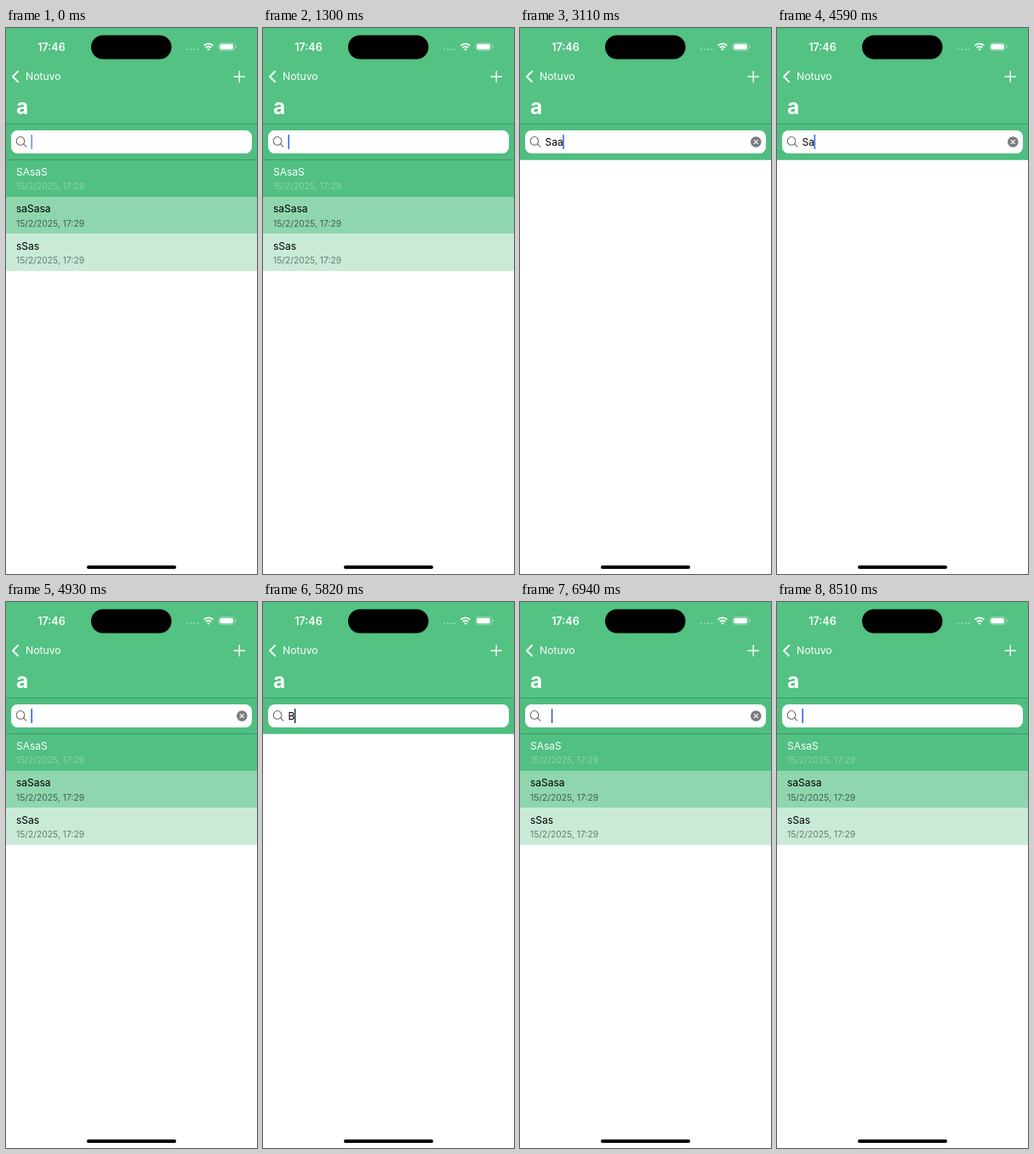
These frames come from a looping animation (295x640 px, 8.63 s). An HTML page:

```html
<!DOCTYPE html>
<html lang="en">
<head>
<meta charset="utf-8">
<title>List search</title>
<style>
  html, body { margin: 0; width: 100%; height: 100%; overflow: hidden; background: #fff; }
  svg { display: block; width: 295px; height: 640px; font: 12px Inter, "Noto Sans", sans-serif; }
  .date { font-size: 10.3px; }
  .line { fill: none; stroke-linecap: round; stroke-linejoin: round; }
</style>
</head>
<body>
<svg viewBox="0 0 295 640">
  <rect width="295" height="154.5" fill="#53c283"/>
  <rect y="113" width="295" height="41.5" fill="#4fbe80"/>
  <rect y="112" width="295" height="1" fill="#40986a"/>

  <!-- Status bar -->
  <text x="37.3" y="26.6" fill="#fff" font-size="12.5" font-weight="600">17:46</text>
  <rect x="100" y="8.5" width="94.5" height="28" rx="14"/>
  <path class="line" d="M213 25h13" stroke="#fff" stroke-opacity=".4" stroke-width="2.2" stroke-dasharray="0 4.2"/>
  <g class="line" stroke="#fff" stroke-width="1.9" style="stroke-linecap:butt">
    <path d="M232.6 20.6a7.6 7.6 0 0 1 10.8 0"/>
    <path d="M234.8 23.1a4.5 4.5 0 0 1 6.4 0"/>
  </g>
  <path d="M236.2 24.9a2.6 2.6 0 0 1 3.6 0L238 26.8z" fill="#fff"/>
  <rect x="250" y="17.5" width="19" height="9" rx="3" fill="none" stroke="#fff" stroke-opacity=".4" stroke-width=".8"/>
  <rect x="251.3" y="18.7" width="15.7" height="6.6" rx="2" fill="#fff"/>
  <path d="M270.2 20.5v3" stroke="#fff" stroke-opacity=".5"/>

  <!-- Navigation bar -->
  <path class="line" d="M14 51l-6 6 6 6" stroke="#fff" stroke-width="1.9"/>
  <text x="23" y="61.4" fill="#fff" font-size="12.2">Notuvo</text>
  <path class="line" d="M268 57h12.4M274.2 50.8v12.4" stroke="#fff" stroke-width="1.4"/>
  <text x="12" y="101" fill="#fff" font-size="24.5" font-weight="700">a</text>

  <!-- Search field -->
  <rect x="6" y="120" width="283" height="27" rx="7.5" fill="#fff"/>
  <g class="line" stroke="#66696a" stroke-width="1.05">
    <circle cx="17" cy="132.4" r="4.8"/>
    <path d="M20.5 135.9l3.3 3.3"/>
  </g>
  <text id="query" x="29.5" y="138"></text>
  <rect id="cursor" y="125" width="1.6" height="17" rx=".6"/>
  <g id="clear">
    <circle cx="277.3" cy="133.5" r="6.3" fill="#7b7d7c"/>
    <path class="line" d="M275.1 131.3l4.4 4.4m0-4.4l-4.4 4.4" stroke="#fff" stroke-width="1.1"/>
  </g>

  <g id="list"></g>
  <rect x="95" y="630" width="105" height="4" rx="2"/>
</svg>
<script>
const LOOP = 8630;
const START = performance.now();
const byId = id => document.getElementById(id);
const query = byId("query"), cursor = byId("cursor"), clear = byId("clear"), list = byId("list");

const rows = [
  ["SAsaS", "#51c082", "#fff", "#91d2ab"],
  ["saSasa", "#8fd6ae", "#000", "#40614e"],
  ["sSas", "#c8ead7", "#000", "#687d71"]
];
list.innerHTML = rows.map(([title, fill, ink, dateInk], i) => {
  const y = 154.5 + i * 43.4;
  return `<rect y="${y}" width="295" height="43.5" fill="${fill}"/>
    <text x="12" y="${y + 18.3}" fill="${ink}">${title}</text>
    <text class="date" x="12" y="${y + 34.8}" fill="${dateInk}">15/2/2025, 17:29</text>`;
}).join("") + '<rect y="154" width="295" height="1" fill="#40986a"/>';

const BLUE = "#3068ee", NAVY = "#183d52", DULL = "#4666a6";

// Each step changes only the listed properties and holds until the next one.
const steps = [
  [0, { text: "", x: 29.4, ink: BLUE, caret: 0.72, clear: 0, list: 1 }],
  [520, { caret: 0.35 }],
  [630, { caret: 0 }],
  [870, { caret: 0.5 }],
  [990, { caret: 1 }],
  [1630, { caret: 0 }],
  [1820, { text: "S", x: 36.8, ink: NAVY, caret: 1 }],
  [1930, { clear: 0.5 }],
  [2030, { clear: 1 }],
  [2210, { caret: 0.4 }],
  [2320, { caret: 0 }],
  [2630, { caret: 1 }],
  [3110, { text: "Saa", x: 50.2, ink: BLUE, list: 0 }],
  [4070, { caret: 0.4 }],
  [4190, { caret: 0 }],
  [4340, { caret: 0.5 }],
  [4450, { caret: 1 }],
  [4590, { text: "Sa", x: 43.5 }],
  [4750, { text: "S", x: 36.8, ink: NAVY }],
  [4930, { text: "", x: 29.4, ink: BLUE, list: 1 }],
  [5040, { clear: 0 }],
  [5580, { caret: 0.4 }],
  [5700, { caret: 0 }],
  [5820, { text: "B", x: 36.8, ink: NAVY, caret: 1, list: 0 }],
  [5940, { text: "Bd", x: 44.6, ink: BLUE, clear: 0.5 }],
  [6040, { text: "Bda", x: 51.9, clear: 1 }],
  [6180, { text: "Bdaa", x: 59.2 }],
  [6590, { text: "Bd", x: 44.6 }],
  [6750, { text: "B", x: 36.8, ink: NAVY }],
  [6940, { text: "", ink: DULL, list: 1 }],
  [7050, { x: 29.4, ink: BLUE, clear: 0 }],
  [7490, { caret: 0.4 }],
  [7610, { caret: 0 }],
  [7850, { caret: 0.5 }],
  [7970, { caret: 0.9 }],
  [8510, { caret: 1 }]
];

function draw(now) {
  const time = Math.max(0, now - START) % LOOP;
  const state = Object.assign({}, ...steps.filter(([at]) => at <= time).map(([, change]) => change));
  query.textContent = state.text;
  cursor.setAttribute("x", state.x);
  cursor.setAttribute("fill", state.ink);
  cursor.setAttribute("opacity", state.caret);
  clear.setAttribute("opacity", state.clear);
  list.setAttribute("opacity", state.list);
  requestAnimationFrame(draw);
}
draw(START);
</script>
</body>
</html>
```
